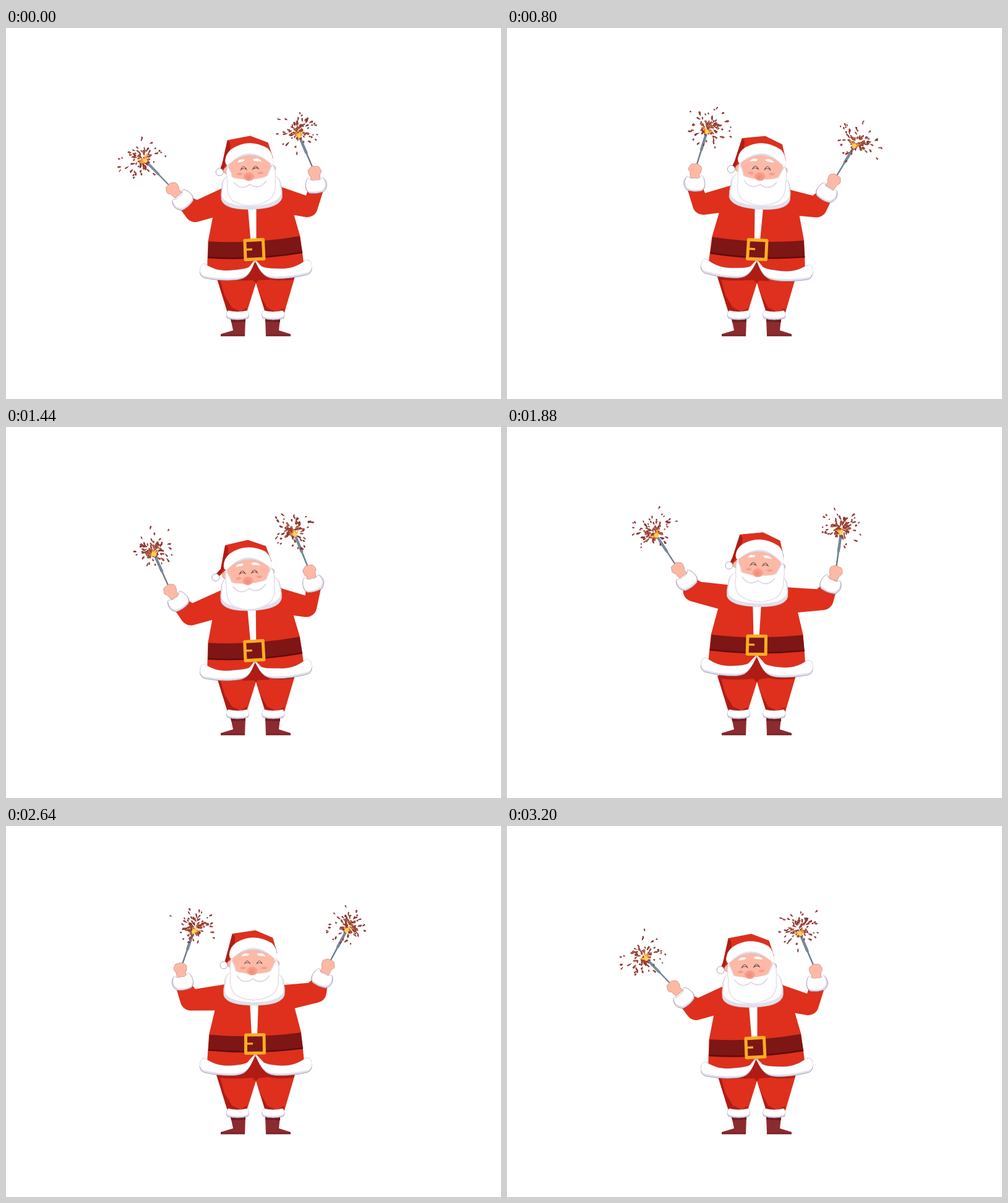
Animation of 800 by 600 pixels, one loop 3.24 s. Source, as an HTML page with a canvas:

```html
<!DOCTYPE html>
<html lang="en">
<head>
<meta charset="utf-8">
<title>Santa with sparklers</title>
<style>
html, body { margin: 0; width: 100%; height: 100%; overflow: hidden; background: #fff; }
canvas { display: block; width: 800px; height: 600px; }
</style>
</head>
<body>
<canvas id="c" width="800" height="600"></canvas>
<script>
const ctx = document.getElementById('c').getContext('2d');
const RED = '#de301c', DARK = '#b01c14', SKIN = '#fcb9a6', SHADE = '#e2dfec', EDGE = '#9a8da8';
const LOOP = 3240, STEP = 40, CYCLE = 1600, RAD = Math.PI / 180;

// Pose keys over one sway cycle
const TIMES = [0, 280, 480, 800, 1040, 1440];
const LEAN = [-1.9, 1.7, 3.6, 3.6, 0, -2.4];
const HEAD_X = [-6, 8, 13, 11.5, 0, -8];
const HEAD_TILT = [-2.5, 3, 6, 3, 0, -4.5];
const ARMS = [
  { side: 1, shoulder: [354, 256], inner: [385, 290],
    cx: [284, 289, 300, 303, 285, 277], cy: [277, 247, 246, 249, 250, 281],
    hx: [270, 277, 295, 304, 282, 266], hy: [261, 230, 226, 230, 232, 265],
    stick: [-44, -33, -7, 17, 19, -24] },
  { side: -1, shoulder: [449, 257], inner: [420, 290],
    cx: [501, 524, 523, 518, 512, 496], cy: [252, 253, 273, 265, 245, 251],
    hx: [499, 531, 534, 528, 520, 491], hy: [234, 235, 257, 247, 226, 234],
    stick: [-23, 8, 26, 31, 28, -22] }
];

// Periodic cubic through the pose keys
function key(vals, t) {
  const n = TIMES.length;
  const T = i => TIMES[(i + n) % n] + Math.floor(i / n) * CYCLE;
  const V = i => vals[(i + n) % n];
  let i = n - 1;
  while (TIMES[i] > t) i--;
  const slope = j => (V(j + 1) - V(j - 1)) / (T(j + 1) - T(j - 1));
  const d = T(i + 1) - T(i), u = (t - T(i)) / d, u2 = u * u, u3 = u2 * u;
  return (2 * u3 - 3 * u2 + 1) * V(i) + (u3 - 2 * u2 + u) * d * slope(i)
       + (3 * u2 - 2 * u3) * V(i + 1) + (u3 - u2) * d * slope(i + 1);
}

const wave = (t, peak) => Math.cos(2 * Math.PI * (t - peak) / 800);
const hash = n => { const v = Math.sin(n * 127.1 + 3.7) * 43758.5453; return v - Math.floor(v); };

function shape(d, fill, stroke, width = 0.8) {
  const p = new Path2D(d);
  if (fill) { ctx.fillStyle = fill; ctx.fill(p); }
  if (stroke) { ctx.strokeStyle = stroke; ctx.lineWidth = width; ctx.stroke(p); }
}
function oval(x, y, rx, ry, fill, stroke) {
  ctx.beginPath();
  ctx.ellipse(x, y, rx, ry, 0, 0, 7);
  ctx.fillStyle = fill;
  ctx.fill();
  if (stroke) { ctx.strokeStyle = stroke; ctx.lineWidth = 0.8; ctx.stroke(); }
}
function group(x, y, angle, draw) {
  ctx.save();
  ctx.translate(x, y);
  ctx.rotate(angle);
  draw();
  ctx.restore();
}

function legs() {
  shape('M340 402L467 402L450 460L419 460L404 412L389 460L358 460Z', RED);
  shape('M340 402L346 407L353 432L365 452L378 458L358 460Z', DARK);
  shape('M404 412L411 432L422 452L434 458L419 460Z', DARK);
  shape('M389 453L378 459L390 459ZM449 453L438 459L450 459Z', DARK);
  shape('M342 400L466 400L465 407Q438 410 424 406L408 408L404 413L398 407Q370 410 343 407Z', DARK);
  shape('M363 470L387 470L386 498L347 498L347 495L367 489Z', '#8c2b2f');
  shape('M419 470L443 470L441 489L460 495L460 498L420 498Z', '#8c2b2f');
  shape('M363 470L387 470L387 475L364 476ZM419 470L443 470L443 476L419 475Z', '#6f1d22');
  shape('M347 496.5H386V498.5H347ZM420 496.5H460V498.5H420Z', '#6f1d22');
  for (const x of [356, 413.5]) {
    const band = b => `M${x + 3} 457Q${x + 18} 461 ${x + 34} 457Q${x + 38} 463 ${x + 35} ${b}Q${x + 18} ${b + 5} ${x + 2} ${b}Q${x - 2} 463 ${x + 3} 457Z`;
    shape(band(469.5), SHADE, EDGE);
    shape(band(466.5), '#fff');
  }
}

function coat() {
  shape('M353 255L450 256L467 296L477 334L480 362L482 382Q450 398 425 391L403 368L382 391Q350 398 325 382L328 338L338 296Z', RED);
  shape('M394 282L408 282L406 340L397 340Z', '#fff');
  shape('M329 337.5Q403 344 476.5 334L480 360Q403 370 327 363Z', '#7d1615');
  shape('M327 361Q403 368 480 358L480 360.5Q403 370.5 327 363.5Z', '#5f0d10');
  ctx.lineJoin = 'round';
  shape('M387.5 338L417 337.5L417.5 367L387.5 367.5Z', '#7d1615', '#fcae22', 5);
  shape('M389 352H399', null, '#fcae22', 3.2);
}

function hem(drop) {
  const n = 370 + drop;
  shape(`M403 ${n + 2}L386 396L382 405L425 405L420 396Z`, DARK);
  const left = b => `M403 ${n}C396 ${n + 13} 386 386 366 387.5C348 389 336 385 325 378Q317 372 314 383Q311 ${b - 9} 320 ${b - 5}Q345 ${b + 1} 368 ${b}C388 ${b - 1} 393 ${n + 24} 403 ${n}Z`;
  const right = b => `M403 ${n}C411 ${n + 13} 421 386 441 387.5C459 389 472 384 482 377Q489 372 493 379Q497 ${b - 8} 487 ${b - 5}Q460 ${b + 1} 438 ${b}C419 ${b - 1} 413 ${n + 24} 403 ${n}Z`;
  for (const f of [left, right]) {
    shape(f(403.5), SHADE, EDGE);
    shape(f(400), '#fff');
  }
}

function collarBeard() {
  shape('M364 236Q352 243 353 256Q351 265 352 274Q357 290 401 290Q446 290 450 273Q451 262 449 254Q449 244 438 238Z', SHADE, '#d5d0df');
  shape('M364 236Q354 243 355 256Q353 264 354 270Q361 284 401 285Q441 284 448 269Q450 262 447 254Q447 244 438 238Z', '#fff');
}

function head(t) {
  const px = 352 + 4 * (wave(t, 140) - 0.7), py = 225;
  shape(`M366 174.5L403 169L431 181L438 206L364 214L${px + 6} ${py - 2}L${px + 2} ${py - 6}L356 212Z`, RED, DARK, 0.6);
  shape(`M366 174.5L370 178Q371 190 366 200L361 212L${px + 6} ${py - 2}L${px + 2} ${py - 6}L356 212Z`, DARK);
  oval(361.5, 223, 4, 5, SKIN, '#c98577');
  oval(437, 223, 4.5, 5.5, SKIN, '#c98577');
  oval(437.5, 223.5, 2, 3, '#f2a08e');
  shape('M366 208Q400 184 434 208L434 246L366 246Z', SKIN);
  shape('M364 216Q370 226 371 234Q380 241 398 241Q418 241 428 234Q432 226 437 216Q443 225 440 245Q442 262 430 273Q400 290 371 273Q360 262 363 243Q361 228 364 216Z', '#fff', SHADE, 1.5);
  oval(383, 229.5, 4.5, 2, '#f79c8c');
  oval(417, 229.5, 4.5, 2, '#f79c8c');
  shape('M370 236Q382 237 390 239Q399 235 408 239Q420 237 430 236Q426 255 399 247Q373 255 370 236Z', '#fff');
  shape('M373 242Q384 258 399 247Q414 258 426 242', null, '#dcd8e5', 1.8);
  const glow = ctx.createRadialGradient(397, 236, 1, 398, 234, 11);
  glow.addColorStop(0, '#f28a78');
  glow.addColorStop(1, '#fbb09e');
  oval(398, 234.5, 9, 7, glow);
  for (const x of [390, 409.5]) {
    shape(`M${x - 4.5} 222.5Q${x} 214 ${x + 4.5} 222.5Q${x} 219 ${x - 4.5} 222.5Z`, '#fff', '#703431', 1);
  }
  shape('M380 211Q384 204 393 207Q392 210 388 210Q384 210 380 211ZM405 207Q414 203 420 211Q415 210 411 210Q407 210 405 207Z', '#fff');
  const brim = dip => `M361 208Q362 196 372 189Q400 172 430 190Q438 198 438 213Q436 217 431 212Q400 ${dip} 368 212Q362 218 361 208Z`;
  shape(brim(188), SHADE, '#d0cad9', 0.7);
  shape(brim(182), '#fff');
  oval(px, py, 6, 6, '#fff', EDGE);
}

function sparks(seed, frame) {
  for (let i = 0; i < 80; i++) {
    const age = frame / 9 + hash(i + seed), turn = Math.floor(age), p = age - turn;
    const k = i * 7.3 + seed * 3.1 + (turn % 9) * 91.7;
    const a = hash(k) * Math.PI * 2, reach = 9 + 31 * Math.pow(hash(k + 1), 1.7);
    const r = 4 + reach * (1 - (1 - p) * (1 - p));
    const len = (3.5 + 7 * hash(k + 2)) * (1 - 0.6 * p), w = (1.6 + 2 * hash(k + 3)) * (1 - 0.45 * p);
    group(Math.cos(a) * r, Math.sin(a) * r * 0.85 - 5 - 3 * p, a + (hash(k + 4) - 0.5) * 1.1, () => {
      ctx.beginPath();
      ctx.moveTo(-len / 2, 0);
      ctx.lineTo(0, -w / 2);
      ctx.lineTo(len / 2, -w / 4);
      ctx.lineTo(len / 3, w / 2);
      ctx.closePath();
      ctx.fillStyle = r < 15 ? '#e98a32' : hash(k + 5) < 0.45 ? '#d96a30' : '#b0402e';
      ctx.strokeStyle = '#80292e';
      ctx.lineWidth = 0.9;
      ctx.fill();
      ctx.stroke();
    });
  }
}

function flame(seed, frame) {
  for (let i = 0; i < 7; i++) {
    const a = (hash(i * 3 + seed + frame * 5) - 0.5) * 2.2, l = 8 + 8 * hash(i + frame * 11 + seed);
    group(0, 3, a, () => shape(`M-2 1L0 ${-l}L2.2 1Z`, i % 2 ? '#fbb93c' : '#ef8f2e'));
  }
  oval(0, 1, 3, 4, '#ffd05a');
}

function armPose(arm, t) {
  const [cx, cy, hx, hy] = [arm.cx, arm.cy, arm.hx, arm.hy].map(v => key(v, t));
  return { cx, cy, hx, hy, turn: Math.atan2(hx - cx, cy - hy), stick: key(arm.stick, t) * RAD };
}

function sleeve(arm, p, place) {
  const s = arm.side, c = Math.cos(p.turn), n = Math.sin(p.turn);
  const at = (x, y) => [p.cx + s * x * c - y * n, p.cy + s * x * n + y * c];
  const bend = at(18, 17), top = place(...arm.shoulder);
  // Unit vector along the upper arm; its normal points to the underside
  const dx = bend[0] - top[0], dy = bend[1] - top[1], d = Math.hypot(dx, dy);
  const ux = dx / d, uy = dy / d;
  const under = (along, out) => [bend[0] + ux * along + s * uy * out, bend[1] + uy * along - s * ux * out];
  ctx.beginPath();
  ctx.moveTo(...top);
  ctx.lineTo(...bend);
  ctx.lineTo(...at(12, 4));
  ctx.lineTo(...at(-12, 9));
  ctx.arcTo(...under(25, 31), ...under(-50, 43), 17);
  ctx.lineTo(...under(-50, 43));
  ctx.lineTo(...place(...arm.inner));
  ctx.closePath();
  ctx.fillStyle = RED;
  ctx.fill();
}

function hand(arm, p, frame) {
  const s = arm.side;
  group(p.hx, p.hy, p.stick, () => {
    shape('M-0.6 0L-0.8 -32L-1.7 -35L-1.5 -62L1.5 -62L1.7 -35L0.8 -32L0.6 0Z', '#7890a0', '#5a6a7a', 0.8);
  });
  const tx = p.hx + Math.sin(p.stick) * 66, ty = p.hy - Math.cos(p.stick) * 66;
  group(tx, ty, p.stick, () => {
    sparks(s * 17 + 40, frame);
    flame(s * 17 + 40, frame);
  });
  group(p.hx, p.hy, p.turn, () => {
    ctx.scale(s, 1);
    shape('M-7 13L-8 3Q-13 -1 -9 -6Q-8 -11 -2 -10Q4 -12 7 -8Q12 -6 10 0Q10 4 7 6L8 13Z', SKIN, '#d58f80', 0.8);
  });
  group(p.cx, p.cy, p.turn, () => {
    ctx.scale(s, 1);
    shape('M-12 -9Q-6 -4 0 -6Q7 -4 11 -11Q16 -8 17 2Q18 10 12 14Q0 17 -11 14Q-18 8 -17 0Q-16 -6 -12 -9Z', SHADE, EDGE);
    shape('M-12 -9Q-6 -4 0 -6Q7 -4 11 -11Q15 -8 16.5 2Q16 9 12 11Q0 14 -9 11Q-15 6 -14.5 0Q-14 -6 -12 -9Z', '#fff');
  });
}

function draw(time) {
  const frame = Math.floor((time % LOOP) / STEP), t = frame * STEP % CYCLE;
  const lean = key(LEAN, t) * RAD;
  const belt = 4.7 * (1 - wave(t, 240));
  const chest = 3.6 * (0.92 - wave(t, 190));
  const stretch = (belt - chest) / 68, lift = chest - 291 * stretch;
  const place = (x, y) => {
    const dx = x - 403, dy = y * (1 + stretch) + lift - 390;
    const c = Math.cos(lean), n = Math.sin(lean);
    return [403 + dx * c - dy * n, 390 + dx * n + dy * c];
  };
  const body = paint => group(403, 390, lean, () => {
    ctx.translate(-403, -390);
    paint();
  });
  const stretched = paint => body(() => {
    ctx.transform(1, 0, 0, 1 + stretch, 0, lift);
    paint();
  });

  ctx.fillStyle = '#fff';
  ctx.fillRect(0, 0, 800, 600);
  legs();
  const poses = ARMS.map(arm => armPose(arm, t));
  ARMS.forEach((arm, i) => sleeve(arm, poses[i], place));
  stretched(coat);
  body(() => {
    ctx.translate(0, belt / 2);
    hem(belt / 2);
  });
  ARMS.forEach((arm, i) => hand(arm, poses[i], frame));
  stretched(collarBeard);
  group(400 + key(HEAD_X, t), 222 + 7.9 * (0.89 - wave(t, 180)), key(HEAD_TILT, t) * RAD, () => {
    ctx.translate(-400, -222);
    head(t);
  });
}

const start = performance.now();
function tick() {
  draw(performance.now() - start);
  requestAnimationFrame(tick);
}
tick();
</script>
</body>
</html>
```
